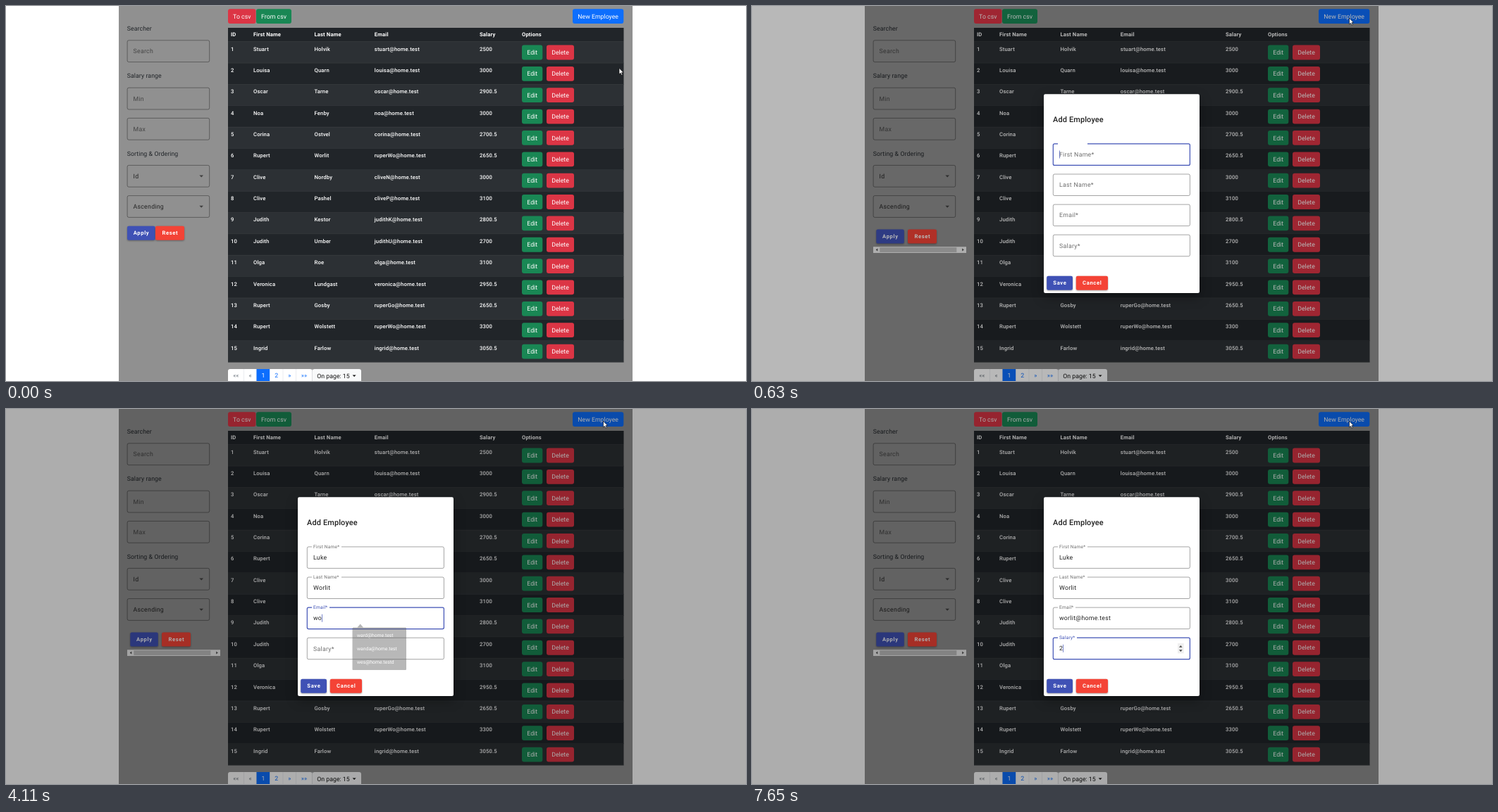
An HTML page that plays this animation: 1050 px wide and 533 px high, repeating every 8000 ms.

```html
<!DOCTYPE html>
<html lang="en">
<head>
<meta charset="utf-8">
<title>Employee table</title>
<style>
  html, body { margin: 0; width: 100%; height: 100%; overflow: hidden; background: #fff; }
  svg { display: block; width: 1050px; height: 533px; }
  text { font-family: Roboto, "Liberation Sans", sans-serif; font-size: 8.75px; text-rendering: geometricPrecision; }
  .mid { text-anchor: middle; }
  .cell { font-size: 7.66px; font-weight: 500; letter-spacing: .0178em; fill: #fff; }
  .head { font-weight: 700; }
  .side { letter-spacing: .0094em; fill: #212529; }
  .field { letter-spacing: .03125em; }
  .action { font-size: 7.66px; font-weight: 700; letter-spacing: .08em; fill: #fff; }
  .title { font-size: 10.94px; font-weight: 500; letter-spacing: .0125em; fill: #212121; }
  .hint { font-size: 6.8px; fill: #fff; }
  .box { fill: none; stroke: rgba(0,0,0,.45); stroke-width: .8; }
  .raised { filter: drop-shadow(0 1px 1px rgba(0,0,0,.35)); }
  .panel { filter: drop-shadow(0 6px 8px rgba(0,0,0,.32)); }
</style>
</head>
<body>
<svg id="stage" viewBox="0 0 1050 533"></svg>
<script>
const LOOP = 8000;
const INDIGO = '#3f51b5', RED = '#f44336', BLUE = '#0d6efd', GREEN = '#198754', DANGER = '#dc3545';
const stage = document.getElementById('stage');

function add(parent, tag, attrs, text) {
  const el = document.createElementNS('http://www.w3.org/2000/svg', tag);
  set(el, attrs);
  if (text !== undefined) el.textContent = text;
  return parent.appendChild(el);
}
function set(el, attrs) {
  for (const key in attrs) el.setAttribute(key, attrs[key]);
}
const group = (parent, attrs = {}) => add(parent, 'g', attrs);
const rect = (parent, x, y, width, height, fill, rx = 0, more = {}) =>
  add(parent, 'rect', { x, y, width, height, fill, rx, ...more });
const label = (parent, x, y, text, cls, fill) =>
  add(parent, 'text', fill ? { x, y, class: cls, fill } : { x, y, class: cls }, text);
const shape = (parent, d, fill) => add(parent, 'path', { d, fill });

function button(parent, x, y, w, text, fill) {
  const face = rect(parent, x, y, w, 20.8, fill, 3);
  label(parent, x + w / 2, y + 13.5, text, 'mid', '#fff');
  return face;
}
function action(parent, x, y, w, text, fill) {
  const g = group(parent);
  rect(g, x, y, w, 20, fill, 2.2, { class: 'raised' });
  label(g, x + w / 2 + .3, y + 12.6, text, 'mid action');
  return g;
}

// Page
rect(stage, 0, 0, 1050, 533, '#fff');
rect(stage, 160, 0, 729, 533, '#909090');

// Sidebar
[['Searcher', 34.8], ['Salary range', 102.3], ['Sorting & Ordering', 212.7]]
  .forEach(([text, y]) => label(stage, 171.7, y, text, 'side'));
[['Search', 48.8], ['Min', 116.2], ['Max', 159.4], ['Id', 226.4, 1], ['Ascending', 269.6, 1]]
  .forEach(([text, y, select]) => {
    rect(stage, 172.1, y, 116.6, 30.8, 'none', 2.2, { class: 'box' });
    label(stage, 180.5, y + 18.6, text, 'field', select ? 'rgba(0,0,0,.76)' : 'rgba(0,0,0,.52)');
    if (select) shape(stage, `M274.4 ${y + 14.2}h5.6l-2.8 2.9z`, 'rgba(0,0,0,.56)');
  });
const apply = action(stage, 172, 312.8, 39.5, 'Apply', INDIGO);
const reset = action(stage, 212, 312.8, 41, 'Reset', RED);
const scrollbar = group(stage);
rect(scrollbar, 172, 342.2, 132, 8.8, '#f1f1f1');
rect(scrollbar, 181.3, 343.2, 109, 6.8, '#c1c1c1');
shape(scrollbar, 'M178.3 344.6v4l-2.6-2z', '#505050');
shape(scrollbar, 'M298.2 344.6v4l2.6-2z', '#505050');

// Table
button(stage, 315, 4.3, 39.5, 'To csv', DANGER);
button(stage, 355, 4.3, 50, 'From csv', GREEN);
const addButton = button(stage, 804, 4.3, 72.3, 'New Employee', BLUE);

const COLS = [319, 351, 437.5, 522.8, 672];
const PITCH = 30.36;
rect(stage, 315, 31, 561.5, 19.8, '#212529');
['ID', 'First Name', 'Last Name', 'Email', 'Salary', 'Options']
  .forEach((text, i) => label(stage, COLS[i] || 732, 43.4, text, 'cell head'));
`Stuart Holvik stuart 2500
Louisa Quarn louisa 3000
Oscar Tarne oscar 2900.5
Noa Fenby noa 3000
Corina Ostvel corina 2700.5
Rupert Worlit ruperWo 2650.5
Clive Nordby cliveN 3000
Clive Pashel cliveP 3100
Judith Kestor judithK 2800.5
Judith Umber judithU 2700
Olga Roe olga 3100
Veronica Lundgast veronica 2950.5
Rupert Gosby ruperGo 2650.5
Rupert Wolstett ruperWo 3300
Ingrid Farlow ingrid 3050.5`.split('\n').forEach((line, i) => {
  const [first, last, box, salary] = line.split(' ');
  const y = 50.8 + PITCH * i;
  rect(stage, 315, y, 561.5, PITCH + .2, i % 2 ? '#212529' : '#2c3034');
  rect(stage, 315, y + PITCH - .5, 561.5, .6, '#373b3e');
  [i + 1, first, last, box + '@home.test', salary]
    .forEach((text, c) => label(stage, COLS[c], y + 12.8, text, 'cell'));
  button(stage, 732, y + 4.8, 29.3, 'Edit', GREEN);
  button(stage, 767, y + 4.8, 39, 'Delete', DANGER);
});

// Pager
rect(stage, 315, 516, 119.5, 22, '#fff', 3);
[['««', 315, 22.7, '#6c757d'], ['«', 337.7, 17.8, '#6c757d'], ['1', 355.5, 18.7, '#fff'],
 ['2', 374.2, 18.8, BLUE], ['»', 393, 18.7, BLUE], ['»»', 411.7, 22.5, BLUE]]
  .forEach(([text, x, w, color]) => {
    if (text === '1') rect(stage, x, 516, w, 20, BLUE);
    else rect(stage, x + w - .3, 516, .6, 20, '#dee2e6');
    label(stage, x + w / 2, 528.3, text, 'mid', color);
  });
rect(stage, 434.7, 516, 69.3, 21, '#f8f9fa', 3);
label(stage, 441.3, 528.8, 'On page: 15', '', '#111');
shape(stage, 'M491.6 524.4h5l-2.5 2.6z', '#111');

// Dialog
const backdrop = rect(stage, 0, 0, 1050, 533, '#000');
const dialog = group(stage);
rect(dialog, 414, 125.3, 221, 282.7, '#fff', 2.2, { class: 'panel' });
label(dialog, 427, 165, 'Add Employee', 'title');
action(dialog, 418.2, 383.7, 36.8, 'Save', INDIGO);
action(dialog, 459.8, 383.7, 45.2, 'Cancel', RED);

const FIELDS = [
  { name: 'First Name*', notch: 476, focus: 630, keys: 'Luke', times: [1230, 1370, 1510, 1700] },
  { name: 'Last Name*', notch: 476, focus: 1770, keys: 'Worlit', times: [2250, 2380, 2580, 2650, 2780, 2850] },
  // "<" is a backspace
  { name: 'Email*', notch: 459, focus: 3120, keys: 'worlit@2h<<home.test',
    times: [3440, 3970, 4180, 4380, 4580, 4650, 4910, 4910, 5110, 5440, 5510, 5640, 5770, 5920, 5990, 6190, 6390, 6520, 6650, 7050] },
  { name: 'Salary*', notch: 461, focus: 7190, keys: '2', times: [7650] }
];
FIELDS.forEach((f, i) => {
  f.top = 195.9 + 43.1 * i;
  f.blur = i < 3 ? FIELDS[i + 1].focus : Infinity;
  f.line = add(dialog, 'path', { fill: 'none' });
  f.label = label(dialog, 0, 0, f.name, 'field');
  f.value = label(dialog, 436, f.top + 18, '', 'field', '#212121');
});
const caret = rect(dialog, 436, 0, .7, 11, INDIGO);

const spinner = group(dialog);
rect(spinner, 604, 333, 8.6, 14.4, '#efefef');
shape(spinner, 'M606 338.7h4.6l-2.3-2.8z', '#444');
shape(spinner, 'M606 342.2h4.6l-2.3 2.8z', '#444');

const hints = group(stage);
shape(hints, 'M493 310.5H498.5L502.7 305.5 507 310.5H567Q568 310.5 568 311.5V370Q568 371 567 371H492.5Q491.5 371 491.5 370V311.5Q491.5 310.5 493 310.5Z', '#585858');
['ward@home.test', 'wanda@home.test', 'wes@home.testd']
  .forEach((text, i) => label(hints, 498, 324 + 19.2 * i, text, 'hint'));

const cursor = add(stage, 'path', {
  d: 'M0 0V8.7L2 6.9 3.4 10 4.8 9.4 3.5 6.4H6.2Z', fill: '#fff', stroke: '#000', 'stroke-width': .6
});

// Timing
const clamp = v => Math.min(1, Math.max(0, v));
const mix = (a, b, p) => a + (b - a) * p;
function bezier(x1, y1, x2, y2) {
  const at = (a, b, s) => 3 * (1 - s) * s * ((1 - s) * a + s * b) + s ** 3;
  return v => {
    const x = clamp(v);
    let lo = 0, hi = 1;
    for (let i = 0; i < 24; i++) {
      const s = (lo + hi) / 2;
      if (at(x1, x2, s) < x) lo = s; else hi = s;
    }
    return at(y1, y2, hi);
  };
}
const fadeEase = bezier(.25, .8, .25, 1);
const openEase = bezier(0, 0, .2, 1);
const floatEase = bezier(.4, 0, .2, 1);
const moveEase = bezier(.3, 0, .4, 1);

// Label progress, held for one short step at a time
function floated(t, start) {
  if (t < start) return 0;
  return floatEase(Math.floor((t - start + 8) / 66) * 66 / 130);
}
function typed(f, t) {
  let text = '';
  f.times.forEach((at, i) => {
    if (t >= at) text = f.keys[i] === '<' ? text.slice(0, -1) : text + f.keys[i];
  });
  return text;
}
function outline(top, open, notch) {
  const l = 427.3, r = 621.4, b = top + 30.5, end = open ? notch : 434;
  return `M434 ${top}H${l + 2}Q${l} ${top} ${l} ${top + 2}V${b - 2}Q${l} ${b} ${l + 2} ${b}` +
    `H${r - 2}Q${r} ${b} ${r} ${b - 2}V${top + 2}Q${r} ${top} ${r - 2} ${top}H${end}`;
}

function drawField(f, t) {
  const open = t >= f.focus;
  const active = open && t < f.blur;
  const up = floated(t, f.focus);
  const tint = up * (1 - floated(t, f.blur));
  const color = [[110, 63], [110, 81], [110, 181]].map(([a, b]) => Math.round(mix(a, b, tint)));
  set(f.line, {
    d: outline(f.top, open, f.notch),
    stroke: active ? INDIGO : 'rgba(0,0,0,.45)',
    'stroke-width': active ? 1.2 : .8
  });
  set(f.label, {
    transform: `translate(436 ${f.top + mix(18.3, 2.2, up)}) scale(${mix(1, .75, up)})`,
    fill: `rgb(${color})`
  });
  f.value.textContent = typed(f, t);
  if (active) {
    const width = f.value.textContent ? f.value.getComputedTextLength() : 0;
    set(caret, { x: 436 + width, y: f.top + 9.6 });
  }
}

function render(t) {
  const step = t < 980 ? Math.floor((t + 2) / 70) * 70 : t;
  const opened = step >= 490;

  const move = moveEase(step / 350);
  set(cursor, { transform: `translate(${mix(870, 847.5, move)} ${mix(88.3, 17.2, move)})` });
  set(addButton, { fill: step >= 280 && !opened ? '#0b5ed7' : BLUE });

  set(apply, { transform: opened ? 'translate(4.3 4.8)' : '' });
  set(reset, { transform: opened ? 'translate(9 4.8)' : '' });
  set(scrollbar, { opacity: opened ? 1 : 0 });

  set(backdrop, { opacity: .32 * fadeEase((step - 477) / 400) });
  const scale = mix(.8, 1, openEase((step - 477) / 150));
  set(dialog, {
    opacity: clamp((step - 520) / 75),
    transform: `translate(524.5 266.6) scale(${scale}) translate(-524.5 -266.6)`
  });

  FIELDS.forEach(f => drawField(f, t));
  const blink = t >= 1160 && t < 1230;
  set(caret, { opacity: t < 630 || blink ? 0 : 1 });
  set(spinner, { opacity: t >= 7190 ? 1 : 0 });
  set(hints, { opacity: t < 3510 || t >= 4180 ? 0 : t < 4040 ? .85 : t < 4110 ? .68 : .42 });
}

const origin = performance.now();
function tick() {
  render((performance.now() - origin) % LOOP);
  requestAnimationFrame(tick);
}
tick();
</script>
</body>
</html>
```
